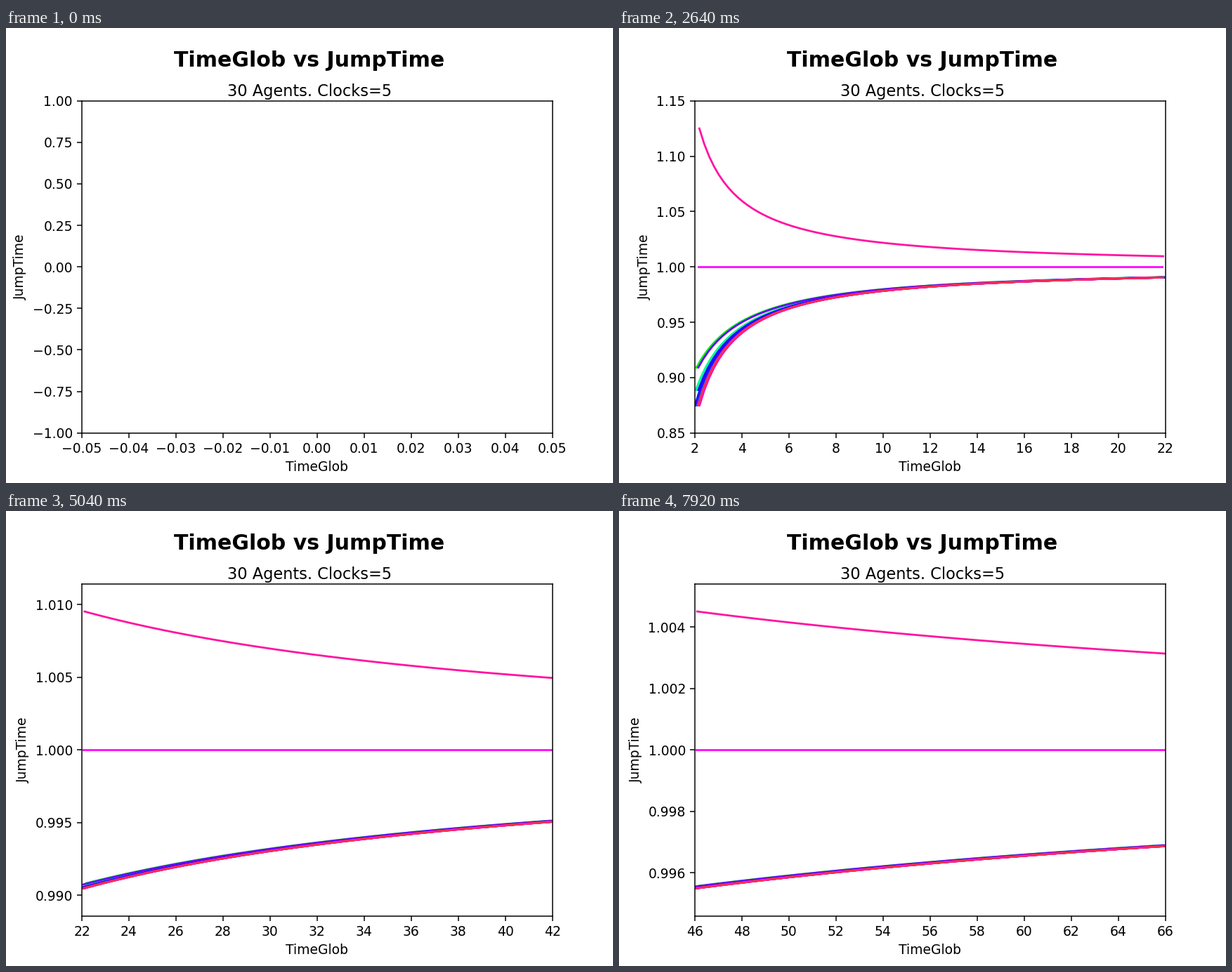
Animation, 864 px wide and 648 px high, one loop 8 s. Source, as a matplotlib script:

```python
import colorsys

import matplotlib.pyplot as plt
import numpy as np
from matplotlib.animation import FuncAnimation

AGENTS = 30
CLOCKS = 5
WINDOW = 20          # seconds of history kept in view
HOLD = 3             # animation ticks per simulated second
STEP = 0.205         # real time between two jumps of an agent
LAG = 0.05           # delay every agent slowly builds up
FAST, STEADY = 27, 25    # the agents that run ahead of and on the clock

jumps = np.arange(330)

# Start times swing between early and late; two agents lead the rest.
starts = np.interp(range(AGENTS),
                   [0, 5, 9, 13, 17, 20, 24, 25, 27, 29],
                   [0.42, 0.40, 0.66, 0.39, 0.72, 0.50, 0.755, 0.70, 0.745, 0.69])
starts[[10, 22]] = 0, 0.08


def agent_color(k):
    lightness = 0.5 + 0.085 * (k / (AGENTS - 1)) ** 10
    return colorsys.hls_to_rgb(k / AGENTS, lightness, 1)


def agent_track(k):
    x = starts[k] + STEP * jumps + LAG * (1 - np.exp(-jumps / 30))
    gain = np.zeros(len(jumps))
    if k == FAST:
        gain[1:] = 2
    elif k == STEADY:
        gain[2:] = 1
    return x, (jumps + gain) / (jumps + 1)


fig, ax = plt.subplots(figsize=(6.4, 4.8), dpi=135)
fig.subplots_adjust(left=0.125, right=0.9, bottom=0.11, top=0.84)
fig.suptitle("TimeGlob vs JumpTime", y=0.95, fontsize=16, fontweight="bold")
fig.text(0.5, 0.85, f"{AGENTS} Agents. Clocks={CLOCKS}", fontsize=12, ha="center")
ax.set_xlabel("TimeGlob")
ax.set_ylabel("JumpTime")
ax.ticklabel_format(useOffset=False)
ax.locator_params(axis="x", nbins=10)

tracks = [agent_track(k) for k in range(AGENTS)]
lines = [ax.plot([], [], color=agent_color(k), lw=1.5)[0] for k in range(AGENTS)]


def update(tick):
    now = tick // HOLD
    if now == 0:
        for line in lines:
            line.set_data([], [])
        ax.set_xlim(-0.05, 0.05)
        ax.set_ylim(-1, 1)
        return lines

    start = max(0, now - WINDOW)
    low, high = np.inf, -np.inf
    for line, (x, y) in zip(lines, tracks):
        seen = (x >= start) & (x <= now)
        line.set_data(x[seen], y[seen])
        low = min(low, y[seen].min())
        high = max(high, y[seen].max())
    margin = 0.1 * (high - low)
    ax.set_xlim(start, now)
    ax.set_ylim(low - margin, high + margin)
    return lines


anim = FuncAnimation(fig, update, frames=200, interval=40,
                     init_func=lambda: update(0), repeat=True, repeat_delay=0)
plt.show()
```
